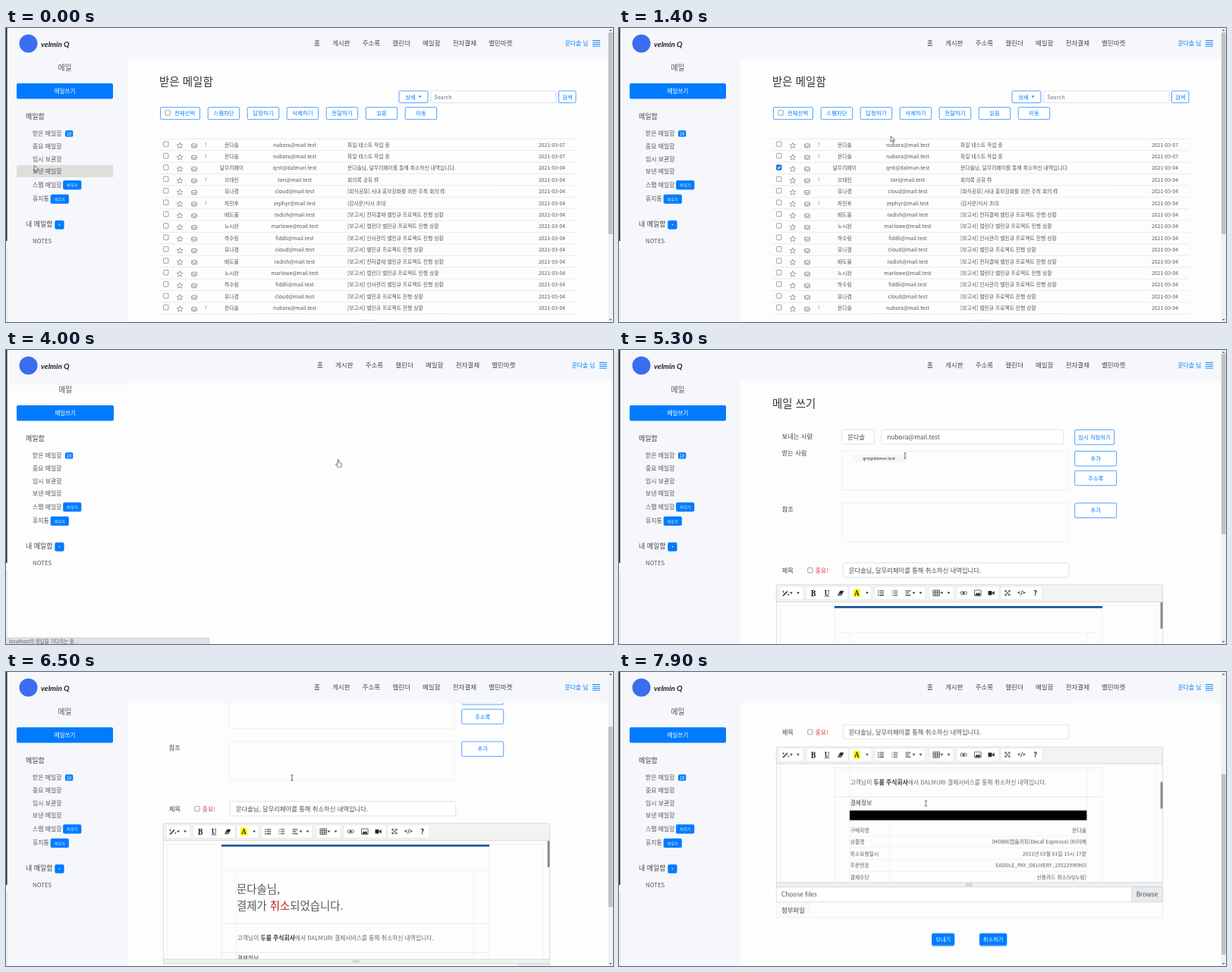
An HTML page that plays this animation: 800 by 388 pixels, repeating every 8 s.

```html
<!DOCTYPE html>
<html lang="ko">
<head>
<meta charset="utf-8">
<title>메일</title>
<style>
html, body { margin: 0; width: 100%; height: 100%; overflow: hidden; background: #fefdfe; }
svg { display: block; width: 800px; height: 388px; }
text { font-family: "Noto Sans CJK KR", "Noto Sans KR", "Noto Sans", sans-serif; white-space: pre; }
.brand { font-family: Lato, "Open Sans", sans-serif; font-style: italic; font-weight: 700; }
.serif { font-family: "Noto Serif", "Liberation Serif", serif; font-weight: 700; }
.cut { animation: 8s step-end infinite; }
.move { animation: 8s linear infinite; }

.list { animation-name: list; }
@keyframes list { 0% { opacity: 1 } 45%, 100% { opacity: 0 } }
.blank { animation-name: blank; }
@keyframes blank { 0% { opacity: 0 } 45% { opacity: 1 } 53.75%, 100% { opacity: 0 } }
.compose { animation-name: compose; }
@keyframes compose { 0% { opacity: 0 } 53.75%, 100% { opacity: 1 } }
.shell { animation-name: shell; }
@keyframes shell { 0% { opacity: 1 } 45% { opacity: 0 } 53.75%, 100% { opacity: 1 } }
.status { animation-name: status; }
@keyframes status { 0% { opacity: 0 } 42.5% { opacity: 1 } 53.75%, 100% { opacity: 0 } }

.sideHover { animation-name: sideHover; }
@keyframes sideHover { 0% { opacity: 1 } 2.5%, 100% { opacity: 0 } }
.rowHover { animation-name: rowHover; }
@keyframes rowHover {
  0% { opacity: 0 }
  9.375% { opacity: 1; transform: translateY(46.2px) }
  11.25% { opacity: 1; transform: translateY(30.8px) }
  15.6% { opacity: 1; transform: translateY(15.4px) }
  16.3% { opacity: 1; transform: none }
  17.25%, 100% { opacity: 0 }
}
.tick { animation-name: tick; }
@keyframes tick { 0% { opacity: 0 } 11.25%, 100% { opacity: 1 } }
.delHover { animation-name: delHover; }
@keyframes delHover { 0%, 20.5% { opacity: 0 } 22%, 23.5% { opacity: 1 } 25%, 100% { opacity: 0 } }
.fwdHover { animation-name: fwdHover; }
@keyframes fwdHover { 0%, 26.9% { opacity: 0 } 28.75%, 100% { opacity: 1 } }

.page { animation-name: page; }
@keyframes page {
  0%, 68.75% { transform: translateY(55px) }
  75% { transform: none }
  81.25% { transform: translateY(-55px) }
  87.5%, 100% { transform: translateY(-156.5px) }
}
.thumb { animation-name: thumb; }
@keyframes thumb {
  0%, 68.75% { transform: translateY(5px) }
  75% { transform: translateY(39px) }
  81.25% { transform: translateY(72px) }
  87.5%, 100% { transform: translateY(135px) }
}
.inner { animation-name: inner; }
@keyframes inner { 0%, 93.75% { transform: none } 98.75%, 100% { transform: translateY(-104px) } }
.innerThumb { animation-name: innerThumb; }
@keyframes innerThumb { 0%, 93.75% { transform: none } 98.75%, 100% { transform: translateY(24px) } }

.pointer { animation-name: pointer; }
@keyframes pointer {
  0% { transform: translate(37px, 181.5px) }
  5% { transform: translate(118px, 150px) }
  9% { transform: translate(200px, 194px) }
  11.25%, 13.75% { transform: translate(211px, 185px) }
  17.5% { transform: translate(358px, 142.5px) }
  21.25% { transform: translate(390px, 118px) }
  25% { transform: translate(412px, 121px) }
  28.75% { transform: translate(431px, 117px) }
  31.25%, 42.5% { transform: translate(437px, 112.5px) }
  48.75%, 53.75% { transform: translate(438px, 144.5px) }
  63.75%, 82.5% { transform: translate(377px, 139.5px) }
  87.5%, 100% { transform: translate(404.4px, 173.5px) }
}
.arrow { animation-name: arrow; }
@keyframes arrow { 0% { opacity: 1 } 27% { opacity: 0 } 53.75% { opacity: 1 } 56.25%, 100% { opacity: 0 } }
.hand { animation-name: hand; }
@keyframes hand { 0% { opacity: 0 } 27% { opacity: 1 } 53.75%, 100% { opacity: 0 } }
.ibeam { animation-name: ibeam; }
@keyframes ibeam { 0% { opacity: 0 } 56.25%, 100% { opacity: 1 } }
</style>
</head>
<body>
<svg id="stage" viewBox="0 0 800 388"></svg>
<script>
const BLUE = '#007bff', INK = '#555', PANEL = '#f5f7fa', PAPER = '#fefdfe', EDGE = '#ced4da', FAINT = '#e6e8eb';

// y is the vertical middle of the line of text
const text = (x, y, size, str, fill = INK, anchor = 'start', more = '') =>
  `<text x="${x}" y="${y + size * .37}" font-size="${size}" fill="${fill}" text-anchor="${anchor}" ${more}>${str}</text>`;
const mid = (x, y, size, str, fill, more) => text(x, y, size, str, fill, 'middle', more);
const rect = (x, y, w, h, fill, stroke = 'none', r = 0) =>
  `<rect x="${x}" y="${y}" width="${w}" height="${h}" rx="${r}" fill="${fill}" stroke="${stroke}" stroke-width=".7"/>`;
const path = (d, stroke = '#333', width = .8, fill = 'none') =>
  `<path d="${d}" stroke="${stroke}" stroke-width="${width}" fill="${fill}"/>`;
const group = (cls, body, more = '') => `<g class="${cls}" ${more}>${body}</g>`;
const button = (x, y, w, h, label, solid, size = 7.4) =>
  rect(x, y, w, h, solid ? BLUE : '#fff', BLUE, 1.5) + mid(x + w / 2, y + h / 2, size, label, solid ? '#fff' : BLUE);
const checkbox = (x, y) => rect(x, y, 6.4, 6.4, '#fff', '#767676', 1);
const caret = (x, y, fill = '#333') => path(`M${x - 2} ${y - 1}h4l-2 2.4z`, 'none', 0, fill);

function shell(wide) {
  const nav = wide ? 4 : 0, end = wide ? 9 : 0, half = wide ? .7 : 0;
  let s = rect(0, 0, wide ? 162 : 160, wide ? 46 : 388, PANEL) + rect(0, 0, 800, 41, PANEL);
  s += '<circle cx="29.5" cy="20.5" r="12" fill="#3b6df0"/>' + text(46, 21, 10, 'velmin Q', '#222', 'start', 'class="brand"');
  [[406, '홈'], [430, '게시판'], [469.7, '주소록'], [509.3, '캘린더'], [549, '메일함'], [588.7, '전자결재'], [636, '벨민마켓']]
    .forEach(([x, label]) => s += text(x + nav, 20.3, 8.5, label, '#444'));
  s += text(736.8 + end, 20.3, 7.7, '문다솔 님', BLUE);
  for (let i = 0; i < 4; i++) s += path(`M${773 + end} ${16.5 + i * 2.5}h10`, BLUE, .9);
  s += mid(77.5 + half, 52, 9.8, '메일');
  s += rect(14, 73, 127 + half * 1.5, 20.5, BLUE, 'none', 2) + mid(77.5 + half, 83.3, 7.5, '메일쓰기', '#fff');
  s += text(26, 117, 9, '메일함', '#444');
  if (!wide) s += group('cut sideHover', rect(14, 181, 127, 16, '#dedfdb'));
  ['받은 메일함', '중요 메일함', '임시 보관함', '보낸 메일함', '스팸 메일함', '휴지통']
    .forEach((label, i) => s += text(35, [139, 156, 172.7, 189.3, 206.7, 225.3][i], 7.9, label));
  s += rect(78, 135.3, 10.3, 8.2, BLUE, 'none', 1.5) + mid(83.1, 139.4, 6, '18', '#fff');
  s += button(75.5, 201.5, 23.5, 11.5, '비우기', true, 5.1) + button(59, 220, 23.5, 11.5, '비우기', true, 5.1);
  s += text(26, 258.3, 9, '내 메일함', '#444') + button(64.7, 254.3, 11.5, 11, '+', true, 5.5);
  return s + text(35, 281, 7.8, 'NOTES');
}

const star = (x, y) => {
  let d = '';
  for (let i = 0; i < 10; i++) {
    const a = i * Math.PI / 5, r = i % 2 ? 1.8 : 4;
    d += `${i ? 'L' : 'M'}${(x + r * Math.sin(a)).toFixed(2)} ${(y - r * Math.cos(a)).toFixed(2)}`;
  }
  return path(d + 'z', '#666', .6);
};
const envelope = (x, y) => rect(x - 3.3, y - 2.4, 6.6, 5, 'none', '#666', .8) + path(`M${x - 3.3} ${y - .8}l3.3 2 3.3-2`, '#666', .7);

const me = 'nubora@mail.test', report = ['전자결재 ', '캘린더 ', '인사관리 ', ''].map(p => `[보고서] ${p}벨민큐 프로젝트 진행 상황`);
const A = ['유나겸', 'cloud@mail.test'], B = ['배도율', 'radish@mail.test'],
  C = ['노시완', 'marlowe@mail.test'], D = ['하수림', 'fiddli@mail.test'], M = ['문다솔', me];
const mails = [
  [...M, '파일 테스트 작업 중', 1], [...M, '파일 테스트 작업 중', 1],
  ['달무리페이', 'qrst@dalmuri.test', '문다솔님, 달무리페이를 통해 취소하신 내역입니다.'],
  ['오태린', 'tori@mail.test', '회의록 공유 件', 1],
  [...A, '[회식공유] 사내 홍보강화를 위한 주최 회의 件'],
  ['차민후', 'zephyr@mail.test', '(감사문)식사 초대', 1],
  [...B, report[0]], [...C, report[1]], [...D, report[2]], [...A, report[3]],
  [...B, report[0]], [...C, report[1]], [...D, report[2]], [...A, report[3]],
  [...M, report[3], 1]
];

function listPage() {
  let s = text(202, 71, 14.5, '받은 메일함', '#333');
  s += rect(518, 83, 38, 15.7, '#fff', BLUE, 1.5) + text(526.3, 90.8, 7.4, '상세', BLUE) + caret(545.7, 90.6, BLUE);
  s += rect(560, 83, 165, 15.7, '#fff', EDGE, 1.5) + text(564.3, 90.8, 7.3, 'Search', '#6c757d');
  s += button(728.5, 83, 22.5, 15.7, '검색');
  s += rect(203.5, 104.7, 52, 16, '#fff', BLUE, 1.5) + checkbox(210, 108.8) + text(222, 112.6, 7.4, '전체선택', BLUE);
  ['스팸차단', '답장하기', '삭제하기', '전달하기', '읽음', '이동']
    .forEach((label, i) => s += button(266.2 + i * 52, 104.7, 41.5, 16, label));
  s += group('move delHover', button(370.2, 104.7, 41.5, 16, '삭제하기', true));
  s += group('move fwdHover', button(422.2, 104.7, 41.5, 16, '전달하기', true));
  s += group('cut rowHover', rect(202, 146.3, 549, 15.4, '#ececec'));
  mails.forEach(([name, mail, title, urgent], i) => {
    const y = 154 + i * 15.4;
    s += path(`M202 ${y - 7.7}h549`, '#dee2e6', .7) + checkbox(207.6, y - 4);
    s += star(229, y + 1.3) + envelope(248, y + 1.3);
    if (urgent) s += mid(263.3, y, 7.5, '!', '#e8343f');
    s += mid(297.5, y, 6.8, name) + mid(380.5, y, 6.8, mail) + text(450, y, 6.8, title);
    s += text(737, y, 6.8, i < 2 ? '2021-03-07' : '2021-03-04', INK, 'end');
  });
  s += path('M202 377.3h549', '#dee2e6', .7);
  s += group('cut tick', rect(207.4, 180.6, 6.8, 6.8, '#0075ff', 'none', 1) + path('M208.9 184l1.5 1.7 2.4-3.3', '#fff', 1.1));
  return s + rect(465, 385.3, 12, 12, '#fff', '#dee2e6', 1) + rect(477, 385.3, 12, 12, '#fff', '#dee2e6', 1);
}

function toolbar() {
  let s = rect(207.3, 254.7, 509.4, 22.6, '#f3f3f3', '#cfcfcf', 1);
  [[211, 32], [247, 55], [304, 29], [337, 67], [409, 32], [445, 56], [503, 55]]
    .forEach(([x, w]) => s += rect(x, 257, w, 17.5, '#fff', '#e3e3e3', 1));
  s += path('M216 269.5l6-6', '#222', 1.5) + path('M216.5 262.5v3m-1.5-1.5h3M223.3 266.5v2.4m-1.2-1.2h2.4', '#222', .6);
  [227, 236, 327, 388.5, 397.5, 425.5, 434.5].forEach(x => s += caret(x, 265.6));
  s += mid(256, 265.8, 10, 'B', '#222', 'class="serif"') + mid(274, 265.3, 9, 'U', '#222', 'class="serif"') + path('M270.5 270h7', '#222', .7);
  s += path('M288.5 268.7l3-5.6h4.5l-3 5.6z', '#222', .6, '#222') + path('M290 267.2h3.4', '#fff', .8);
  s += rect(309, 260.5, 9, 10.5, '#ff0') + mid(313.5, 265.8, 9, 'A', '#222', 'class="serif"');
  for (let i = 0; i < 3; i++) {
    const y = 263 + i * 2.8;
    s += path(`M341 ${y}h1.5m1 0h5.5`, '#222', 1.1) + path(`M359.5 ${y}h1m1.3 0h5.5`, '#222', .9);
    s += path(`M377.5 ${y}h${i % 2 ? 5 : 7}`, '#222', 1);
  }
  s += rect(414, 262, 8.6, 7.4, 'none', '#222') + path('M414 264.5h8.6M414 267h8.6M416.9 262v7.4M419.8 262v7.4', '#222', .7);
  s += rect(450, 263.8, 4.8, 3.8, 'none', '#222', 1.9) + rect(453.6, 263.8, 4.8, 3.8, 'none', '#222', 1.9) + path('M452.5 265.7h3.5', '#222', .8);
  s += rect(468.5, 262, 8.6, 7.4, 'none', '#222', .6) + path('M469.3 268.6l2.2-3 1.6 1.4 1.4-2 2 3.6z', '#222', .3, '#222');
  s += rect(486.5, 263, 5, 5.4, '#222', 'none', .8) + path('M491.5 265.7l3-2.4v4.8z', '#222', .3, '#222');
  s += path('M509 262.6l6 6m0-6l-6 6M509 264.6v-2h2m2 0h2v2m0 2v2h-2m-2 0h-2v-2', '#222', .8);
  return s + mid(530.5, 265.6, 7, '&lt;/&gt;', '#222', 'font-weight="700"') + mid(548.7, 265.6, 9.5, '?', '#222', 'font-weight="700"');
}

function receipt() {
  let s = path('M212.5 600V282.5h495.5V600M284 600V283M637 600V283M284 317.3h353M304 600V317.3M616.5 600V317.3', FAINT, .6);
  s += path('M284 387h353M284 425.5h353', '#dedfe2', .7) + rect(284, 283, 353, 2.6, '#0b5196');
  s += text(304, 342, 14.4, '문다솔님,');
  s += text(304, 363.5, 14.4, '결제가 <tspan fill="#b8231f" font-weight="500">취소</tspan>되었습니다.');
  s += text(304.7, 406.3, 7.8, '고객님이 <tspan fill="#333" font-weight="700">두룸 주식회사</tspan>에서 DALMURI 결제서비스를 통해 취소하신 내역입니다.', '#666');
  s += text(304.7, 433, 7.8, '결제정보', '#444') + rect(304, 443.3, 312.5, 12.8, '#000');
  [['구매자명', '문다솔'], ['상품명', '(MOBR)캡슐커피(Decaf Espresso) (R)아메'], ['취소요청일시', '2021년 03월 01일 15시 17분'],
   ['주문번호', 'SADDLE_PAY_DELIVERY_25522990965'], ['결제수단', '신용카드 취소(VQ누림)']].forEach(([key, value], i) => {
    const y = 469.3 + i * 15.45;
    s += text(304.7, y, 6.8, key) + text(616, y, 6.8, value, INK, 'end') + path(`M304 ${y + 7.8}h312.5`, FAINT, .6);
  });
  return s + path('M357 461.5V600', FAINT, .6);
}

function composePage() {
  const label = (y, str) => text(214.7, y, 8.3, str, '#444');
  const input = (x, y, w, str) => rect(x, y, w, 19, '#fff', EDGE, 2) + text(x + 7.6, y + 9.5, 8.3, str, '#495057');
  let s = text(202, 16, 14.5, '메일 쓰기', '#333');
  s += label(59, '보내는 사람') + input(293.7, 50, 43, '문다솔') + input(345.8, 50, 240, me);
  s += button(600.7, 50.3, 52, 19.5, '임시 저장하기');
  s += label(81, '받는 사람') + rect(294, 78.3, 297, 51.5, PAPER, FAINT);
  s += rect(308, 83, 70, 10, '#f5f6f8') + mid(342.5, 88.3, 5.05, 'qrst@dalmuri.test', '#222');
  s += button(600.7, 78.5, 55, 19.5, '추가') + button(600.7, 104.3, 55, 19.5, '주소록');
  s += label(155, '참조') + rect(294, 146.8, 297, 51.5, PAPER, FAINT) + button(600.7, 147, 55, 19.5, '추가');
  s += label(235.7, '제목') + checkbox(248.8, 232.5) + text(258.8, 235.7, 7.8, '중요!', '#dc3545');
  s += input(295.3, 226, 297.5, '문다솔님, 달무리페이를 통해 취소하신 내역입니다.');
  s += rect(207.3, 277, 509.4, 157.5, PAPER, '#cfcfcf');
  s += group('', group('move inner', receipt()), 'clip-path="url(#sheet)"');
  s += group('move innerThumb', rect(713.6, 277.7, 3, 35, '#8b8b8b'));
  s += toolbar() + rect(207.3, 434.3, 509.4, 5.6, '#f1f1f1', '#d4d4d4') + path('M457 436.2h9M457 437.9h9', '#999', .6);
  s += rect(207.3, 440.3, 509.4, 19.5, '#fff', EDGE, 2) + text(214, 450, 8.3, 'Choose files', '#495057');
  s += rect(675.7, 440.3, 41, 19.5, '#e9ecef', EDGE, 1) + mid(696, 450, 8.3, 'Browse', '#495057');
  s += rect(207.3, 460.5, 509.4, 20, PAPER, FAINT) + rect(207.6, 460.8, 44, 19.4, '#f8f9fa') + text(214.3, 470.5, 8.3, '첨부파일', '#444');
  return s + button(412.5, 501.7, 29.5, 15.5, '보내기', true, 7.3) + button(475.3, 501.7, 35.7, 15.5, '취소하기', true, 7.3);
}

const track = rect(793.3, 0, 6.7, 388, '#f1f1f1') + path('M795 4h3.6l-1.8-2.2zM795 384h3.6l-1.8 2.2z', 'none', 0, '#666');
const bar = h => rect(794, 0, 5.6, h, '#c1c1c1');

const pointer =
  group('cut arrow', path('M0 0v7.6l1.8-1.6 1.4 3 1.3-.6-1.4-2.9h2.4z', '#333', .7, '#fff')) +
  group('cut hand', path('M-.9 .8q.9-1.5 1.7 0v3l2.8 .8q1 .5 .8 2l-.7 3.4h-4.6l-2.4-3.2q-.5-1.5 .9-1l1.5 1z', '#333', .7, '#fff')) +
  group('cut ibeam', path('M-1.6-3.4h3.2M0-3.4v6.8M-1.6 3.4h3.2', '#444', .8));

document.getElementById('stage').innerHTML =
  '<defs><clipPath id="sheet"><rect x="207.6" y="277.4" width="508.8" height="156.8"/></clipPath></defs>' +
  rect(0, 0, 800, 388, PAPER) +
  group('cut list', listPage()) +
  group('cut compose', group('move page', composePage())) +
  group('cut shell', shell(false) + track) +
  group('cut list', group('', bar(266), 'transform="translate(0 6)"')) +
  group('cut compose', group('move thumb', bar(238))) +
  group('cut blank', shell(true)) +
  rect(0, 0, 1.5, 281, '#222') + rect(0, 281, 1.2, 107, '#fff') + path('M1.2 290v98', '#ccc', .6) +
  group('cut status', rect(0, 379.7, 268, 9, '#dee1e6', '#cfd2d6', 1) + text(4, 385, 6.4, 'localhost의 응답을 기다리는 중...')) +
  group('move pointer', pointer);
</script>
</body>
</html>
```
